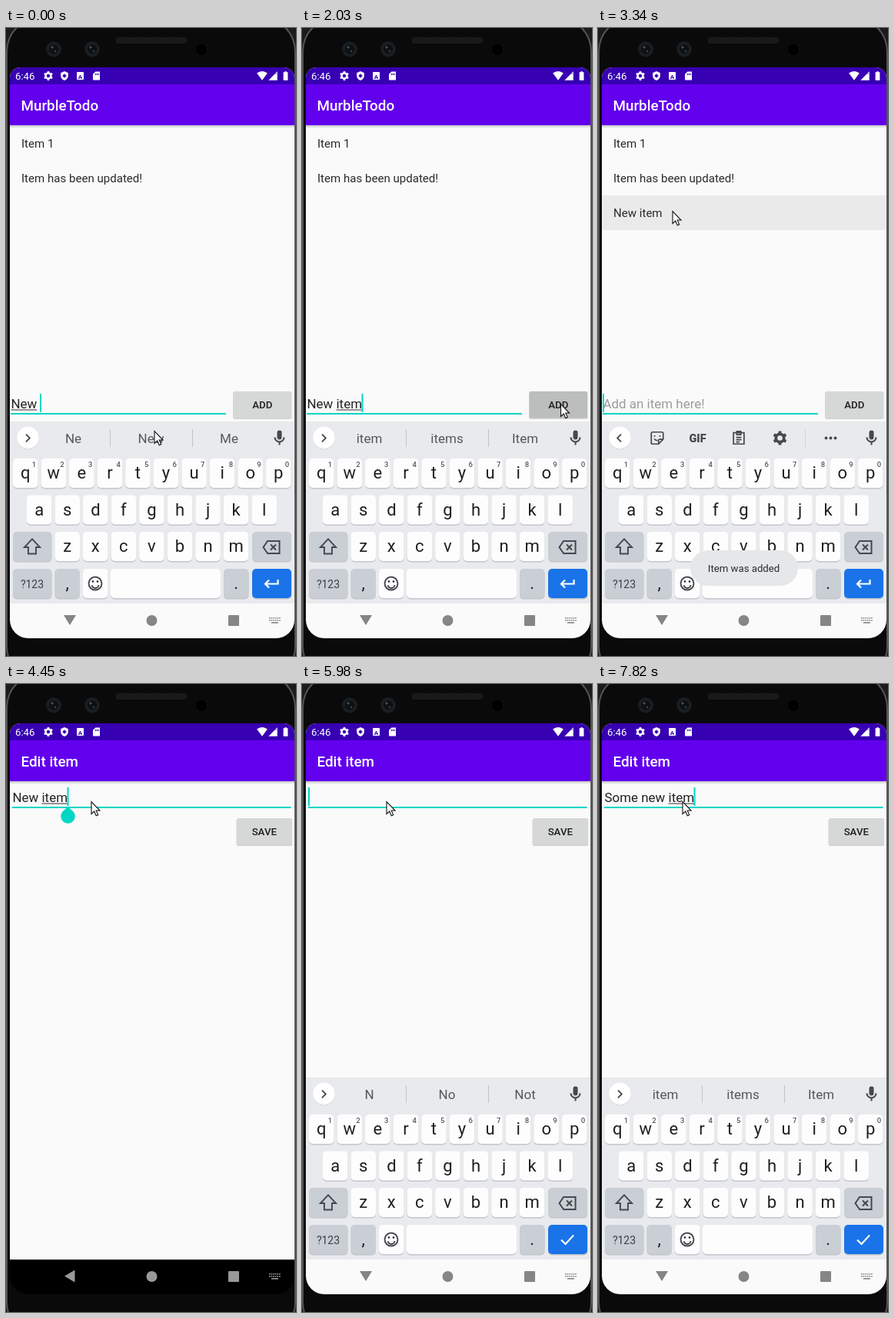
Animation, 377 px wide and 814 px high, one loop 8 s. Source, as an HTML page with a canvas:

```html
<!DOCTYPE html>
<html lang="en">
<head>
<meta charset="utf-8">
<title>Todo app</title>
<style>
html, body { margin: 0; width: 100%; height: 100%; overflow: hidden; background: #0a0a0b; }
canvas { display: block; }
</style>
</head>
<body>
<canvas id="stage" width="377" height="814"></canvas>
<script>
const c = document.getElementById('stage').getContext('2d');
const LOOP = 8000, TEAL = '#03d6c4', GREY = '#45484c';

// [time, text, suggestions]; _.._ marks the word being composed
const typing = [
  [0, '_New_ ', 'Ne,New,Me'],
  [120, 'New ', 'Ne,New,Me'],
  [270, 'New ', 'one,and,friend'],
  [550, 'New _i_', 'one,and,friend'],
  [700, 'New _it_', 'I,in,is'],
  [850, 'New _ite_', 'it,its,It'],
  [970, 'New _item_', 'ite,item,items'],
  [1090, 'New _item_', 'item,items,Item'],
  [2060, '', ''],
  [3480, 'New item', 'item,items,Item'],
  [4300, 'New _item_', 'item,items,Item'],
  [5080, 'New _ite_', 'item,items,Item'],
  [5200, 'New _ite_', 'ite,item,items'],
  [5320, 'New _it_', 'it,its,It'],
  [5440, 'New _i_', 'I,in,is'],
  [5590, 'New ', 'one,and,friend'],
  [5720, '_New_', 'New,Now,new'],
  [5850, '_N_', 'Ne,New,Me'],
  [5980, '', 'N,No,Not'],
  [6100, '', ''],
  [6220, '_S_', ''],
  [6350, '_So_', 'S,So,See'],
  [6480, '_Som_', 'So,Some,Soon'],
  [6640, '_Some_', 'Som,Some,Same'],
  [6790, '_Some_ ', 'Somew,Somewhere,Somewhat'],
  [7040, 'Some ', 'of,people,things'],
  [7190, 'Some _n_', 'of,people,things'],
  [7310, 'Some _new_', 'n,no,not'],
  [7430, 'Some new ', 'new,news,New'],
  [7560, 'Some new _i_', 'one,and,friend'],
  [7690, 'Some new _item_', 'I,in,is'],
  [7820, 'Some new _item_', 'item,items,Item']
];
const mousePath = [
  [0, 192.5, 522], [1610, 192.5, 522], [1950, 336, 487], [2200, 336, 487],
  [2540, 100, 264], [2659, 100, 264], [2660, 96.5, 237], [3740, 96.5, 237],
  [4180, 110.5, 152], [4569, 110.5, 152], [4570, 109.5, 152], [LOOP, 109.5, 152]
];
const caretOff = [[1460, 1970], [2540, 2940], [3480, 4300], [4960, 5080]];

const between = (t, a, b) => t >= a && t < b;
const ramp = (t, a, b) => Math.min(1, Math.max(0, (t - a) / (b - a)));
const ease = p => 1 - (1 - p) ** 3;

function rect(x, y, w, h, color) {
  c.fillStyle = color;
  c.fillRect(x, y, w, h);
}
function pill(x, y, w, h, r, color) {
  c.fillStyle = color;
  c.beginPath();
  c.roundRect(x, y, w, h, r);
  c.fill();
}
function disc(x, y, r, color) {
  c.fillStyle = color;
  c.beginPath();
  c.arc(x, y, r, 0, 7);
  c.fill();
}
function text(s, x, y, size, color, weight = 400, align = 'left') {
  c.font = `${weight} ${size}px Roboto, sans-serif`;
  c.fillStyle = color;
  c.textAlign = align;
  c.fillText(s, x, y);
  return c.measureText(s).width;
}
// Path on a 24-unit grid centred on x, y; stroked when a line width is given
function icon(d, x, y, scale, color, line) {
  c.save();
  c.translate(x, y);
  c.scale(scale, scale);
  c.translate(-12, -12);
  c.fillStyle = c.strokeStyle = color;
  c.lineWidth = line || 1;
  const path = new Path2D(d);
  line ? c.stroke(path) : c.fill(path, 'evenodd');
  c.restore();
}
function gear(x, y, r, color) {
  c.strokeStyle = color;
  c.lineWidth = r * .42;
  c.beginPath();
  c.arc(x, y, r * .58, 0, 7);
  c.stroke();
  for (let i = 0; i < 6; i++) {
    const a = i * Math.PI / 3 + Math.PI / 6, dx = Math.cos(a), dy = Math.sin(a);
    c.beginPath();
    c.moveTo(x + dx * r * .6, y + dy * r * .6);
    c.lineTo(x + dx * r, y + dy * r);
    c.stroke();
  }
}

function phone() {
  rect(0, 0, 377, 814, '#1b1b1c');
  pill(1, -14, 375, 860, 45, '#0a0a0b');
  c.strokeStyle = '#555';
  c.lineWidth = 2;
  c.stroke();
  pill(143, 12, 92, 8, 3, '#1d1d1e');
  for (let x = 145; x < 234; x += 3) rect(x, 13, 1, 6, '#111');
  for (const x of [62, 112]) {
    disc(x, 27.5, 10, '#1a1e20');
    disc(x, 27.5, 6, '#0d1012');
    disc(x - 2, 25, 1.5, '#4a555b');
    disc(x + 2, 30, 1.3, '#3a4449');
  }
  disc(254, 28, 7, '#000');
}

function statusBar() {
  rect(5, 51, 370, 22, '#3700b3');
  text('6:46', 12, 67, 13.2, '#fff');
  gear(55, 62, 6, '#fff');
  icon('M12 1L3 5v6c0 5.5 3.8 10.7 9 12 5.200-1.300 9-6.500 9-12V5zM12 7l5 5-5 5-5-5z', 76, 62, .54, '#fff');
  pill(92, 57, 9, 10, 1, '#fff');
  text('A', 96.5, 65.500, 8, '#3700b3', 700, 'center');
  icon('M20 2H10L4 8v14h16zM9 6h2v4H9zM12.500 6h2v4h-2zM16 6h2v4h-2z', 117.500, 62, .56, '#fff');
  icon('M0 6Q12-3 24 6L12 22z', 333, 62, .57, '#fff');
  icon('M2 22H22V2z', 347, 62, .57, '#fff');
  icon('M18 6h8', 345, 62, .5, '#3700b3', 1);
  icon('M8 4h2V2h4v2h3v18H7V4z', 363.500, 62, .58, '#fff');
}

function appBar(title) {
  rect(5, 51, 370, 695, '#fafafa');
  const shade = c.createLinearGradient(0, 126, 0, 130);
  shade.addColorStop(0, 'rgba(0,0,0,.22)');
  shade.addColorStop(1, 'rgba(0,0,0,0)');
  rect(5, 126, 370, 4, shade);
  rect(5, 73, 370, 53, '#6200ee');
  text(title, 19.500, 107, 18.840, '#fff', 500);
  statusBar();
}

function button(label, x, y, w, pressed) {
  pill(x - .5, y + .5, w + 1, 35.500, 2.500, 'rgba(0,0,0,.16)');
  pill(x, y, w, 34.500, 2, pressed ? '#bcbdbd' : '#d6d7d7');
  text(label, x + w / 2, y + 22, 13.200, '#1f1f1f', 500, 'center');
}

function field(x, base, end, value, caret, hint, focused = true) {
  rect(x - .5, base + (focused ? 6 : 6.500), end - x, focused ? 2 : 1, focused ? TEAL : '#777');
  let pen = x;
  value.split('_').forEach((part, i) => {
    const w = text(part, pen, base, 16.960, '#222');
    if (i % 2) rect(pen, base + 1.500, w, 1, '#333');
    pen += w;
  });
  if (!value) text(hint, x, base, 16.960, '#9b9b9b');
  if (caret) rect(pen - .5, base - 19, 2, 24, TEAL);
  return pen + .5;
}

function key(label, x, y, w, color = '#fdfdfd') {
  pill(x, y + 1, w, 38.500, 5, '#c3c6cb');
  pill(x, y, w, 38, 5, color);
  text(label, x + w / 2, y + 26, 22, '#1e1f21', 400, 'center');
}

function strip(words) {
  disc(28.500, 532, 14.500, '#d9dbde');
  disc(28.500, 531, 14.200, '#fff');
  icon(words ? 'M9.500 6l6 6-6 6' : 'M14.500 6l-6 6 6 6', 28, 531.500, .82, GREY, 2.200);
  icon('M12 14a3 3 0 0 0 3-3V5a3 3 0 0 0-6 0v6a3 3 0 0 0 3 3zM17 11a5 5 0 0 1-10 0H5a7 7 0 0 0 6 6.900V21h2v-3.100a7 7 0 0 0 6-6.900z', 355.500, 531.500, 1, GREY);
  if (words) {
    words.split(',').forEach((w, i) => text(w, [87.500, 188.500, 290][i], 538, 17, '#55585c', 400, 'center'));
    for (const x of [135, 242]) rect(x, 520, 1, 23, '#c2c5c9');
    return;
  }
  icon('M14 21H5a2 2 0 0 1-2-2V5a2 2 0 0 1 2-2h14a2 2 0 0 1 2 2v9zM14 21v-5a2 2 0 0 1 2-2h5M8 8v2M16 8v2M7.500 13q2 3 5 2.500', 77, 531.500, .86, GREY, 2);
  text('GIF', 129.500, 536.500, 14.500, GREY, 900, 'center');
  icon('M4 4h16v17H4zM9 2h6v5H9zM8 11h8M8 14.500h8M8 18h5', 183, 531.500, .86, GREY, 2);
  gear(236.500, 531.500, 9, GREY);
  rect(269, 520, 1, 23, '#d2d4d8');
  for (const x of [296.500, 302.500, 308.500]) disc(x, 531.500, 1.900, GREY);
}

function keyboard(words, check, drop) {
  c.save();
  c.beginPath();
  c.rect(5, 126, 370, 620);
  c.clip();
  c.translate(0, drop);
  rect(5, 510, 370, 236, '#e8eaed');
  strip(words);
  const pitch = 36.550, w = 32.500, side = '#caced5';
  [['qwertyuiop', 9, 558], ['asdfghjkl', 27, 605.500], ['zxcvbnm', 63.500, 653]].forEach(([row, x, y], r) =>
    [...row].forEach((ch, i) => {
      key(ch, x + i * pitch, y, w);
      if (!r) text((i + 1) % 10, x + i * pitch + 27.500, y + 10.500, 9.500, '#55585c', 500, 'center');
    }));
  key('', 9, 653, 50.500, side);
  icon('M12 3L3 12.500h4.500V20h9v-7.500H21z', 34, 672.500, 1.120, GREY, 1.700);
  key('', 320, 653, 51, side);
  icon('M22.500 4H7L1.500 12l5.500 8h15.500zM11 8.500l7 7M18 8.500l-7 7', 345, 673, 1, GREY, 2);
  key('', 9, 701, 50.500, side);
  text('?123', 34, 725.500, 14, '#3c3f43', 400, 'center');
  key(',', 63.500, 701, w, side);
  key('', 100, 701, w);
  c.strokeStyle = GREY;
  c.lineWidth = 1.900;
  c.beginPath();
  c.arc(116, 720, 8.500, 0, 7);
  c.moveTo(120.500, 722);
  c.arc(116, 721.500, 4.500, .2, Math.PI - .2);
  c.stroke();
  disc(113, 717.500, 1.400, GREY);
  disc(119, 717.500, 1.400, GREY);
  key('', 136, 701, 143);
  key('.', 283, 701, w, side);
  key('', 320, 701, 51, '#1a73e8');
  icon(check ? 'M4 12.500l5.500 5.500L20 6.500' : 'M20.500 7v5.500H4M9 7.500l-5 5 5 5', 345, 720, 1, '#fff', 2.200);
  c.restore();
}

function navBar(light) {
  rect(5, 746, 370, 45, light ? '#fafafa' : '#000');
  const color = light ? '#858585' : '#999';
  icon(light ? 'M4 5.500H20L12 18.500z' : 'M18.500 4V20L5 12z', 83, 767.500, 1, color);
  disc(189.500, 768, 7, color);
  pill(289, 761, 14, 14, 1, color);
  for (let i = 0; i < 6; i++) {
    rect(342 + i * 2.600, 764, 1.600, 1.600, color);
    rect(342 + i * 2.600, 767, 1.600, 1.600, color);
  }
  rect(345, 770, 9, 1.600, color);
}

function listScreen(t, value, caret) {
  appBar('MurbleTodo');
  if (between(t, 3220, 3740)) rect(5, 217, 370, 45, `rgba(0,0,0,${.1 * ramp(t, 3100, 3480)})`);
  const items = ['Item 1', 'Item has been updated!'];
  if (t >= 2060) items.push('New item');
  items.forEach((s, i) => text(s, 20, 154.500 + i * 45.200, 15.070, '#2a2a2a'));
  field(6.500, 493, 286.500, value, caret, 'Add an item here!');
  button('ADD', 295.500, 471, 75.500, between(t, 1990, 2260));
}

function editScreen(t, value, caret) {
  appBar('Edit item');
  const focused = t >= 4300;
  const x = field(8.500, 153, 371, value, caret, '', focused);
  button('SAVE', 300, 174, 71.500);
  if (focused && t < 5080) {
    c.fillStyle = TEAL;
    c.beginPath();
    c.arc(x, 171.500, 9.300, -Math.PI / 4, Math.PI * 1.250);
    c.lineTo(x, 159);
    c.fill();
  }
}

function toast(t) {
  const a = ramp(t, 2200, 2500) * (1 - ramp(t, 3900, 4180));
  if (!a) return;
  c.globalAlpha = a;
  pill(120, 677, 140, 46, 23, '#e6e7e9');
  text('Item was added', 189.500, 705, 13.200, '#2b2b2b', 400, 'center');
  c.globalAlpha = 1;
}

function mouse(t) {
  const i = mousePath.findIndex(p => p[0] > t);
  const [t0, x0, y0] = mousePath[i - 1], [t1, x1, y1] = mousePath[i];
  const p = ramp(t, t0, t1);
  c.save();
  c.translate(x0 + (x1 - x0) * p, y0 + (y1 - y0) * p);
  const arrow = new Path2D('M.5.5V16.500L4.200 13L6.700 18.700L9.200 17.600L6.700 12H11.500z');
  c.fillStyle = '#fff';
  c.fill(arrow);
  c.strokeStyle = '#111';
  c.lineWidth = 1.100;
  c.stroke(arrow);
  c.restore();
}

function draw(t) {
  phone();
  c.save();
  c.beginPath();
  c.roundRect(5, 51, 370, 740, [14, 14, 24, 24]);
  c.clip();

  const [, value, words] = typing.findLast(e => t >= e[0]);
  const caret = !caretOff.some(([a, b]) => between(t, a, b));
  const open = ease(ramp(t, 3480, 3880));
  if (open < 1) listScreen(t, t < 3480 ? value : '', caret);
  if (open > 0) {
    const s = .85 + .15 * open;
    c.save();
    c.globalAlpha = open;
    c.translate(190, 398);
    c.scale(s, s);
    c.translate(-190, -398);
    editScreen(t, value, caret);
    c.restore();
  }

  const up = t < 4000 ? 1 - ease(ramp(t, 3350, 3740)) : ease(ramp(t, 4480, 4690));
  if (up > 0) keyboard(t < 4000 && t >= 2060 ? '' : words, t > 4000, 236 * (1 - up));
  navBar(up > 0);
  toast(t);
  c.restore();
  mouse(t);
}

function tick(now) {
  draw(now % LOOP);
  requestAnimationFrame(tick);
}
requestAnimationFrame(tick);
</script>
</body>
</html>
```
